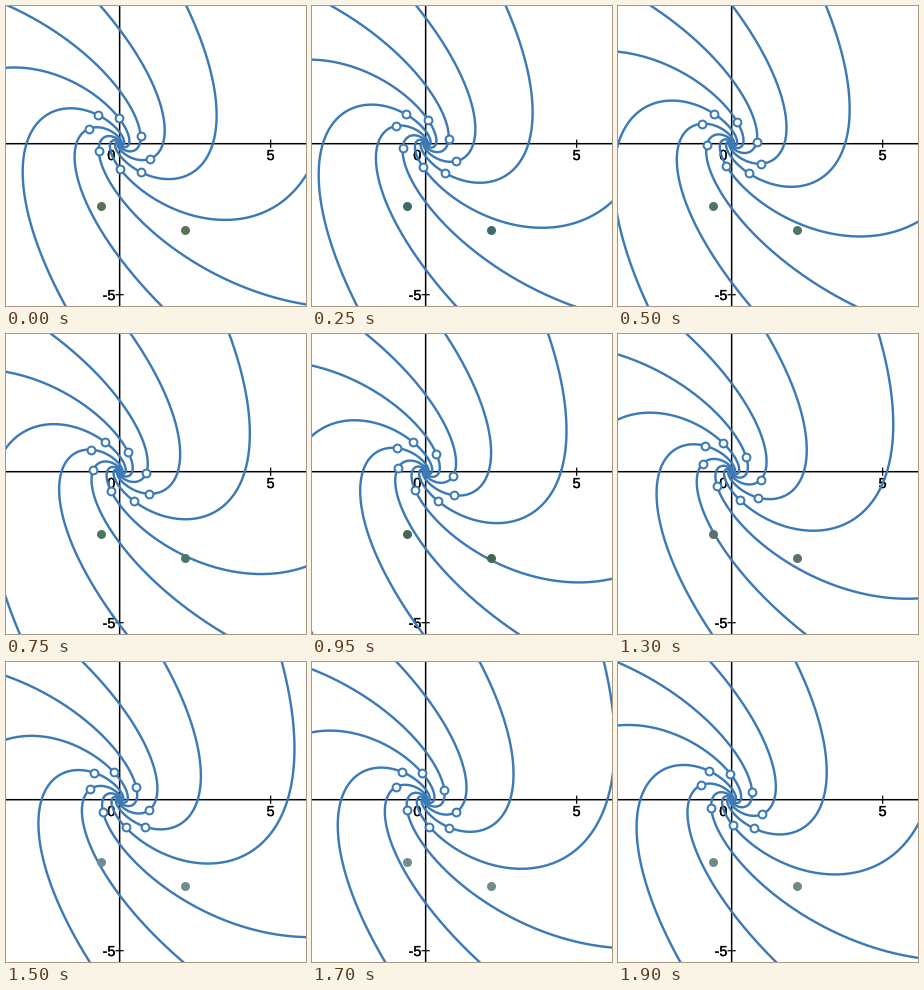
Write a matplotlib script that moves like this. It is 300 by 300 pixels and loops after 1.95 s.

```python
import numpy as np
import matplotlib.pyplot as plt
from matplotlib.animation import FuncAnimation
from matplotlib.patheffects import withStroke

SIZE, DPI = 300, 100
FRAMES, STEP = 39, 50
ORIGIN = np.array([113.65, 137.7])
UNIT = 30.2
PX = 72 / DPI
BLUE = "#3b7ab5"
ARMS = 8

# Stable spiral x' = A x; the columns of A are shown as two dots.
A = np.array([[-0.63, 2.155], [-2.075, -2.87]])
vals, vecs = np.linalg.eig(A)
i = np.argmax(vals.imag)
v = vecs[:, i] / vecs[0, i]
BASIS = np.column_stack([v.real, v.imag])
GROWTH = -vals[i].real / vals[i].imag

# Slow colour drift of the dots: time in the loop and rgb.
KEY_TIMES = np.array([0, 250, 500, 750, 1100, 1500, 1900, 1950])
KEY_RGB = np.array([
    (88, 114, 88), (64, 106, 106), (80, 118, 98), (76, 120, 98),
    (70, 84, 74), (112, 140, 148), (112, 140, 130), (88, 114, 88),
]) / 255


def to_px(p):
    """Map a 2 x n array of plane points to stage pixels."""
    return ORIGIN[0] + UNIT * p[0], ORIGIN[1] - UNIT * p[1]


def spiral(start, turn):
    angle = start + turn
    return BASIS @ (np.exp(GROWTH * turn) * np.array([np.cos(angle), np.sin(angle)]))


fig = plt.figure(figsize=(SIZE / DPI, SIZE / DPI), dpi=DPI, facecolor="white")
ax = fig.add_axes([0, 0, 1, 1])
ax.set_xlim(0, SIZE)
ax.set_ylim(SIZE, 0)
ax.axis("off")


def segment(xs, ys, width):
    ax.plot(xs, ys, color="black", lw=width * PX, snap=False, zorder=1)


def label(x, y, text, ha):
    ax.text(x, y, text, ha=ha, va="baseline", family="Liberation Sans",
            fontsize=14.5 * PX, color="black", zorder=2,
            path_effects=[withStroke(linewidth=0.3 * PX, foreground="black")])


ox, oy = ORIGIN
segment([0, SIZE], [oy, oy], 1.5)
segment([ox, ox], [0, SIZE], 1.5)
segment([ox + 5 * UNIT] * 2, [oy - 3.5, oy + 3.5], 1.2)
segment([ox - 3.5, ox + 3.5], [oy + 5 * UNIT] * 2, 1.2)
label(109.4, 154, "0", "right")
label(ox + 5 * UNIT, 154, "5", "center")
label(109.4, 294, "-5", "right")

turn = np.linspace(-6, 4, 700)
curves = [ax.plot([], [], color=BLUE, lw=2.4 * PX, zorder=3)[0] for _ in range(ARMS)]
rings, = ax.plot([], [], "o", ms=7.8 * PX, mfc="white", mec=BLUE,
                 mew=2 * PX, zorder=4)
dots, = ax.plot(*to_px(A), "o", ms=9 * PX, mew=0, zorder=5)


def update(n):
    # One arm spacing per loop, starting one step short of the axis.
    phase = 2 * np.pi / ARMS * (n - 1) / FRAMES
    starts = 2 * np.pi * np.arange(ARMS) / ARMS - phase
    for curve, start in zip(curves, starts):
        curve.set_data(*to_px(spiral(start, turn)))
    rings.set_data(*to_px(spiral(starts, np.zeros(ARMS))))
    dots.set_color([np.interp(n * STEP, KEY_TIMES, c) for c in KEY_RGB.T])
    return [*curves, rings, dots]


anim = FuncAnimation(fig, update, frames=FRAMES, interval=STEP,
                     repeat=True, repeat_delay=0, blit=False)
plt.show()
```
